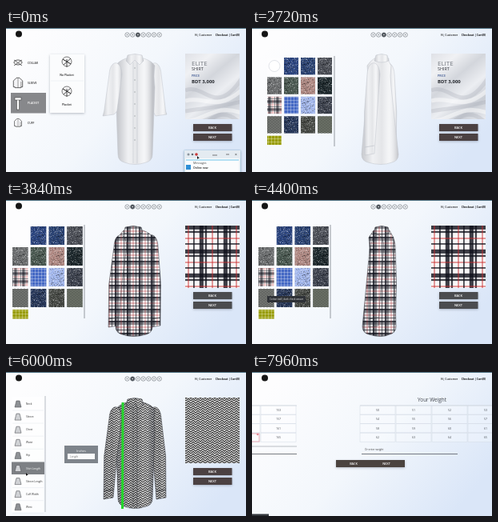
Write an HTML page with a canvas that moves like this. It is 300 px wide and 180 px high and loops after 8 s.

```html
<!DOCTYPE html>
<html lang="en">
<head>
<meta charset="utf-8">
<title>Shirt designer</title>
<style>
html, body { margin: 0; width: 100%; height: 100%; overflow: hidden; background: #eef3fb; }
canvas { display: block; width: 300px; height: 180px; }
</style>
</head>
<body>
<canvas id="stage" width="300" height="180"></canvas>
<script>
const g = document.getElementById('stage').getContext('2d');
const LOOP = 8000;
const clamp = v => Math.max(0, Math.min(1, v));
const ease = v => { v = clamp(v); return v * v * (3 - 2 * v); };
const mix = (a, b, k) => a + (b - a) * k;

function rect(x, y, w, h, fill, line) {
  g.fillStyle = fill;
  g.fillRect(x, y, w, h);
  if (line) { g.strokeStyle = line; g.lineWidth = .5; g.strokeRect(x, y, w, h); }
}
function line(x1, y1, x2, y2, color, w = 1) {
  g.strokeStyle = color; g.lineWidth = w;
  g.beginPath(); g.moveTo(x1, y1); g.lineTo(x2, y2); g.stroke();
}
function dot(x, y, r, fill, stroke) {
  g.beginPath(); g.arc(x, y, r, 0, 7);
  if (fill) { g.fillStyle = fill; g.fill(); }
  if (stroke) { g.strokeStyle = stroke; g.lineWidth = .7; g.stroke(); }
}
function text(s, x, y, size, color = '#333', align = 'left', weight = 400) {
  g.font = `${weight} ${size}px "Open Sans", Arial, sans-serif`;
  g.textAlign = align; g.fillStyle = color;
  g.fillText(s, x, y);
}
function shadowed(draw) {
  g.save();
  g.shadowColor = 'rgba(60,70,90,.35)'; g.shadowBlur = 3; g.shadowOffsetY = 1;
  draw();
  g.restore();
}

// ---- fabrics ----
function weave(size, draw) {
  const c = document.createElement('canvas');
  c.width = c.height = size;
  draw(c.getContext('2d'), size);
  return g.createPattern(c, 'repeat');
}
const plaid = size => weave(size, (p, s) => {
  const bar = (at, w, color) => {
    p.fillStyle = color;
    p.fillRect(at * s, 0, w * s, s);
    p.fillRect(0, at * s, s, w * s);
  };
  p.fillStyle = '#f8f7f7'; p.fillRect(0, 0, s, s);
  bar(.06, .17, 'rgba(14,16,26,.8)');
  bar(.29, .08, 'rgba(14,16,26,.75)');
  bar(.58, .04, 'rgba(200,40,45,.75)');
  bar(.8, .06, 'rgba(14,16,26,.75)');
});
const herring = weave(6, p => {
  p.fillStyle = '#c2c2c2'; p.fillRect(0, 0, 6, 6);
  p.fillStyle = '#3a3a3a';
  for (let i = 0; i < 6; i++) {
    const x = i < 3 ? i : 5 - i;
    for (let y = 0; y < 6; y += 3) p.fillRect(i, (x + y) % 6, 1, 1.3);
  }
});
const speckle = color => weave(24, (p, s) => {
  p.fillStyle = color; p.fillRect(0, 0, s, s);
  let seed = 7;
  const next = () => (seed = seed * 16807 % 2147483647) / 2147483647 * s | 0;
  for (let i = 0; i < 260; i++) {
    p.fillStyle = i % 2 ? 'rgba(255,255,255,.25)' : 'rgba(0,0,0,.25)';
    p.fillRect(next(), next(), 1, 1);
  }
});
const check = color => weave(4, (p, s) => {
  p.fillStyle = color; p.fillRect(0, 0, s, s);
  p.fillStyle = 'rgba(255,255,255,.3)';
  p.fillRect(0, 0, 1, s); p.fillRect(0, 2, s, 1);
});
const stripe = (color, dark) => weave(4, (p, s) => {
  p.fillStyle = color; p.fillRect(0, 0, s, s);
  p.fillStyle = dark;
  for (let i = 0; i < s; i++) p.fillRect(i * 2 % s, i, 2, 1);
});
const PLAID_S = plaid(15), PLAID_L = plaid(30);
const swatches = [
  '#fdfdfe', ...['#2d4680', '#2c4474', '#4d5058', '#6d6f70', '#4b5a52', '#b08a84', '#1f2a2e'].map(speckle),
  plaid(10), check('#4468c4'), speckle('#a4b8ec'), speckle('#3f4450'),
  stripe('#8a8d88', '#4a4c4a'), speckle('#2a3a5c'), speckle('#4a4d48'), stripe('#7c8176', '#4c524a'),
  check('#989c08')
];

// ---- shirt ----
// collar x, collar half width, shoulders, hem corners, left arm top and cuff, right arm top and cuff
const FRONT = [161, 11, 137, 186, 140, 183, 137, 128, 186, 194];
const SIDE = [162, 9, 144, 174, 137, 183, 152, 147, 170, 174];
const BACK = [159, 12, 140, 184, 137, 183, 143, 134, 182, 187];
const PROFILE = [162, 10, 146, 177, 138, 180, 157, 152, 171, 173];
const turns = [[2020, FRONT], [2720, SIDE], [3840, BACK], [4400, PROFILE], [4540, FRONT]];

function poseAt(t) {
  let i = 0;
  while (i < turns.length - 2 && t > turns[i + 1][0]) i++;
  const [t0, a] = turns[i], [t1, b] = turns[i + 1];
  const k = clamp((t - t0) / (t1 - t0));
  return a.map((v, n) => mix(v, b[n], k));
}
function cloth(path, fabric, x1, x2, edge) {
  g.fillStyle = fabric; g.fill(path);
  const shade = g.createLinearGradient(x1, 0, x2, 0);
  shade.addColorStop(0, 'rgba(40,45,60,.22)');
  shade.addColorStop(.3, 'rgba(40,45,60,.02)');
  shade.addColorStop(.55, 'rgba(40,45,60,.08)');
  shade.addColorStop(.75, 'rgba(255,255,255,.06)');
  shade.addColorStop(1, 'rgba(40,45,60,.25)');
  g.fillStyle = shade; g.fill(path);
  g.strokeStyle = edge; g.lineWidth = .5; g.stroke(path);
}
function sleeve(x, cuff, bottom, fabric, edge) {
  const p = new Path2D(), w = bottom < 120 ? 7 : 6, mid = mix(x, cuff, .7), elbow = Math.min(105, bottom - 4);
  p.moveTo(x - 8, 58);
  p.bezierCurveTo(x - 7, 39, x + 7, 39, x + 8, 58);
  p.lineTo(mid + 8, elbow);
  p.lineTo(cuff + w, bottom);
  p.lineTo(cuff - w, bottom + 2);
  p.lineTo(mid - 8, elbow);
  p.closePath();
  cloth(p, fabric, Math.min(x, cuff) - 8, Math.max(x, cuff) + 8, edge);
  if (bottom > 120) line(cuff - w, bottom - 8, cuff + w, bottom - 10, edge, .7);
}
function shirt([cx, cw, sl, sr, hl, hr, lx, lc, rx, rc], fabric, edge, sleeveEnd, front) {
  if (sleeveEnd) sleeve(rx, rc, sleeveEnd, fabric, edge);
  const body = new Path2D();
  body.moveTo(cx - cw, 38);
  body.quadraticCurveTo(sl + 4, 41, sl, 47);
  body.quadraticCurveTo(sl + 2, 60, sl, 74);
  body.lineTo(hl, 158);
  body.quadraticCurveTo(hl, 166, hl + 8, 168);
  body.quadraticCurveTo(cx, 173, hr - 8, 168);
  body.quadraticCurveTo(hr, 166, hr, 158);
  body.lineTo(sr, 74);
  body.quadraticCurveTo(sr - 2, 60, sr, 47);
  body.quadraticCurveTo(sr - 4, 41, cx + cw, 38);
  body.closePath();
  cloth(body, fabric, hl, hr, edge);
  if (front) {
    line(cx - 2, 43, cx - 2, 169, edge, .5);
    line(cx + 3, 43, cx + 3, 169, edge, .5);
    for (let y = 50; y < 155; y += 15) dot(cx, y, .7, '#9a9da2');
  }
  if (sleeveEnd) sleeve(lx, lc, sleeveEnd, fabric, edge);
  const collar = new Path2D();
  collar.moveTo(cx - cw + 2, 34);
  collar.quadraticCurveTo(cx, 31, cx + cw - 2, 34);
  collar.lineTo(cx + cw, 41);
  if (front) {
    collar.lineTo(cx + 6, 46); collar.lineTo(cx, 40); collar.lineTo(cx - 6, 46);
    collar.lineTo(cx - cw, 41);
  } else collar.quadraticCurveTo(cx, 45, cx - cw, 41);
  collar.closePath();
  cloth(collar, fabric, cx - cw, cx + cw, edge);
}
function shirtIcon(x, y, s = 1) {
  g.save(); g.translate(x, y); g.scale(s, s);
  g.beginPath();
  g.moveTo(-2, -6); g.lineTo(2, -6); g.lineTo(6, -2); g.lineTo(6, 6); g.lineTo(4, 6);
  g.lineTo(4, 7); g.lineTo(-4, 7); g.lineTo(-4, 6); g.lineTo(-6, 6); g.lineTo(-6, -2);
  g.closePath();
  g.fillStyle = '#f4f4f6'; g.fill();
  g.strokeStyle = '#333'; g.lineWidth = .8; g.stroke();
  line(0, -5, 0, 7, '#555', .6); line(4, -1, 4, 6, '#555', .6);
  g.restore();
}

// ---- page parts ----
function backdrop() {
  const sky = g.createLinearGradient(40, 0, 250, 180);
  sky.addColorStop(0, '#fdfdfe'); sky.addColorStop(.5, '#f3f7fc'); sky.addColorStop(1, '#dae6f8');
  rect(0, 0, 300, 180, sky);
  rect(0, 0, 300, 1, '#4f7182');
}
function header(step) {
  dot(16, 7.5, 4, '#151515');
  for (let i = 0; step >= 0 && i < 7; i++) {
    const on = i === step;
    dot(151.5 + i * 6.7, 8.5, 2.7, on ? '#454b52' : '#f2f5f8', '#7b8188');
    dot(151.5 + i * 6.7, 8.5, .8, on ? '#fff' : '#858b92');
  }
  text('Hi, Customer', 236, 10, 3.4, '#222', 'left', 600);
  text('Checkout | Cart(0)', 292, 10, 3.3, '#111', 'right', 700);
}
function button(y, label, color) {
  shadowed(() => rect(234, y, 48.5, 9, color));
  text(label, 258, y + 6, 4, '#fff', 'center', 600);
}
function product(fabric, h) {
  if (fabric) {
    rect(224, 32, 68, h, fabric);
    return;
  }
  const satin = g.createLinearGradient(224, 32, 292, 114);
  ['#dfe1e6', '#f0f1f4', '#d3d6dc', '#eceef2', '#c9cdd4', '#e9ebef'].forEach((c, i) => satin.addColorStop(i / 5, c));
  rect(224, 32, 68, h, satin);
  g.save();
  g.beginPath(); g.rect(224, 32, 68, h); g.clip();
  for (let i = 0; i < 5; i++) {
    g.beginPath(); g.moveTo(224, 78 + i * 13);
    g.bezierCurveTo(248, 68 + i * 16, 262, 112 - i * 6, 294, 64 + i * 14);
    g.strokeStyle = i % 2 ? 'rgba(255,255,255,.5)' : 'rgba(150,156,168,.25)';
    g.lineWidth = 5; g.stroke();
  }
  g.restore();
  text('ELITE', 232, 47, 8, '#777b82');
  text('SHIRT', 232, 53, 5.4, '#33363c');
  text('PRICE', 232, 61, 3.6, '#34508c', 'left', 600);
  text('BDT 3,000', 232, 69, 6, '#22252b', 'left', 700);
}
function menu(selected) {
  ['COLLAR', 'SLEEVE', 'PLACKET', 'CUFF'].forEach((name, i) => {
    const y = 44 + i * 25, on = i === selected;
    if (on) rect(6, y - 13, 44, 25.5, '#87888b');
    if (i === 0) {
      g.beginPath(); g.ellipse(15, y - 1, 5, 3, 0, 0, 7);
      g.fillStyle = '#fff'; g.fill(); g.strokeStyle = '#333'; g.lineWidth = .8; g.stroke();
      line(10, y - 4, 20, y + 3, '#333', .7); line(20, y - 4, 10, y + 3, '#333', .7);
    } else if (i === 2) {
      rect(13.5, y - 6, 3, 14, '#fff', '#333');
      rect(11, y - 7, 8, 3, '#fff', '#333');
    } else shirtIcon(15, y - 1, i === 3 ? .75 : .95);
    text(name, 27, y + 1, 3.4, on ? '#fff' : '#333', 'left', 600);
  });
  shadowed(() => rect(55, 33, 43, 73, '#fbfcfd'));
  line(56, 66, 97, 66, '#e1e4e8', .5);
  const names = selected === 2 ? ['No Placket', 'Placket'] : ['Full', 'Half'];
  names.forEach((name, i) => {
    const y = 44 + i * 37;
    if (selected === 2) {
      dot(76, y - 2, 6, '#f7f7f8', '#444');
      line(71, y - 5, 81, y + 1, '#222', 1); line(81, y - 6, 72, y + 2, '#222', .8);
      line(76, y - 5, 76, y + 5, '#222', .8);
    } else shirtIcon(75, y + 1, 1.2);
    text(name, 76, y + 16, 3.4, '#222', 'center', 600);
  });
}
function fabrics(k) {
  const x0 = mix(19, 8, k), y0 = mix(37, 33, k), px = mix(21, 22.7, k), py = mix(24.4, 26, k);
  swatches.forEach((f, i) => {
    const x = x0 + i % 4 * px, y = y0 + Math.floor(i / 4) * py;
    rect(x, y, px - 3, i === 16 ? 11.5 : py - 3, f);
    if (i === 0 && k < 1) dot(x + 9, y + 10.5, 7, '#fff', '#d4d9e0');
  });
  const bar = mix(103, 98, k);
  line(bar, y0 - 2, bar, 148, '#a5aab1', 1.2);
}
function options(selected) {
  rect(7, 31, 40, 144, 'rgba(255,255,255,.75)');
  line(49, 30, 49, 175, '#a9aeb5', .8);
  ['Neck', 'Sleeve', 'Chest', 'Waist', 'Hip', 'Shirt Length', 'Sleeve Length', 'Cuff Width', 'Wrist'].forEach((name, i) => {
    const y = 40 + i * 16.1, on = i === selected;
    if (on) rect(7, y - 8, 41, 15.5, '#7d8084');
    else line(8, y + 8, 47, y + 8, '#e3e6ea', .5);
    g.beginPath();
    g.moveTo(13, y - 4); g.lineTo(17, y - 4); g.lineTo(19, y + 4); g.lineTo(11, y + 4); g.closePath();
    g.fillStyle = i % 4 ? '#d0d2d5' : '#8e9195'; g.fill();
    g.strokeStyle = '#54575b'; g.lineWidth = .6; g.stroke();
    text(name, 25, y + 1, 3.2, on ? '#fff' : '#333');
  });
}
function lengthBox() {
  rect(73, 92, 42, 22, '#7e848b');
  text('Inches', 94, 100, 3.8, '#fff', 'center');
  rect(77, 102, 34, 7, '#fafbfc');
  text('Length', 80, 106.7, 3.2, '#777');
}
function pointer(x, y) {
  g.beginPath();
  g.moveTo(x, y); g.lineTo(x, y + 4); g.lineTo(x + 1.1, y + 3); g.lineTo(x + 2.8, y + 3);
  g.closePath(); g.fillStyle = '#111'; g.fill();
}
function form(x, title, first, hint) {
  text(title, x + 90, 37, 6.4, '#43474d', 'center');
  line(x, 42, x + 180, 42, '#b9c0c9', .6);
  for (let i = 0; i < 16; i++) {
    const cx = x + i % 4 * 45, cy = 42 + Math.floor(i / 4) * 11.4;
    rect(cx, cy, 44, 11, 'rgba(255,255,255,.25)', '#d3dae4');
    text(first + i, cx + 22, cy + 7, 3.6, '#4c5056', 'center');
  }
  text(hint, x + 6, 98, 3.2, '#444');
  line(x + 2, 102.5, x + 122, 102.5, '#5a5e64', .8);
}
function formPage(t) {
  const enter = 75 * (1 - ease((t - 6360) / 400));
  const slide = ease((t - 7200) / 760);
  if (slide > 0) form(mix(340, 135, slide), 'Your Weight', 50, 'Or enter weight');
  const old = mix(60 + enter, -124, slide);
  form(old, 'Your Height', 150, 'Or enter height');
  line(old, 93, old + 180, 93, '#8d949c', .6);
  line(old + 122, 102.5, old + 180, 102.5, '#5a5e64', .8);
  g.strokeStyle = '#e59aa5'; g.lineWidth = .8;
  g.strokeRect(old + 92, 77, 41, 10);
  dot(old + 131, 78, 1.3, '#e58d9a');
  shadowed(() => rect(105, 110, 86, 9, '#4b433f'));
  text('BACK', 127, 116, 3.8, '#fff', 'center', 600);
  text('NEXT', 168, 116, 3.8, '#fff', 'center', 600);
  rect(0, 177.5, 21, 2.5, '#33373c');
}
function popup(t) {
  const y = 153 + 28 * ease((t - 120) / 280);
  if (y >= 180) return;
  shadowed(() => rect(223, y, 70, 30, '#fbfcfd', '#8cc5e4'));
  rect(223, y, 70, 10, '#e4ebf1');
  dot(228, y + 5, 1.5, '#8a949d'); dot(233, y + 5, 1.3, '#5f6870');
  dot(238, y + 5, 1.8, '#c93a3a');
  line(258, y + 6, 264, y + 6, '#444', .7); line(275, y + 5, 279, y + 5, '#444', .7);
  text('×', 286, y + 7, 5, '#333');
  line(225, y + 12, 291, y + 12, '#6cc3e9', 1);
  rect(225, y + 18, 6, 6, '#2f8fd6');
  text('Messages', 234, y + 17, 3.6, '#444');
  text('Online now', 234, y + 23, 3.4, '#222', 'left', 600);
  pointer(239, y + 7);
}

function draw(t) {
  backdrop();
  if (t >= 6360) {
    header(-1);
    formPage(t);
    return;
  }
  const isPlaid = t >= 2860 && t < 4540, isHerring = t >= 4540;
  header(isPlaid || isHerring ? 1 : 2);
  product(isPlaid ? PLAID_L : isHerring ? herring : null, isPlaid ? 78 : 82);
  const color = isPlaid ? '#4b4c4f' : '#4b4142', top = isPlaid ? 115 : 120;
  button(top, 'BACK', color);
  button(top + 12, 'NEXT', color);

  const fabric = isPlaid ? PLAID_S : isHerring ? herring : '#f4f5f7';
  const edge = isPlaid || isHerring ? '#33353a' : '#bfc3ca';
  const end = t < 1180 ? 108 : t < 2020 ? 0 : 157;
  shirt(poseAt(t), fabric, edge, end, t < 2300 || isHerring);

  if (t < 2020) {
    menu(t < 540 ? 2 : 1);
    if (t >= 1180) {
      g.beginPath(); g.moveTo(128, 54); g.quadraticCurveTo(126, 37, 134, 36);
      g.quadraticCurveTo(140, 38, 138, 47); g.lineTo(132, 46); g.lineTo(132, 54); g.closePath();
      g.fillStyle = '#f8f9fa'; g.fill(); g.strokeStyle = '#a7acb4'; g.lineWidth = .7; g.stroke();
      pointer(118, 76);
    }
    popup(t);
  } else if (t < 4540) {
    fabrics(t < 2860 ? 0 : 1);
    if (t >= 4100) {
      rect(19, 120, 48, 8, '#2f3237');
      text('Cotton twill, dark check weave', 43, 125.3, 3, '#e8e8e8', 'center');
    }
  } else {
    options(t < 5380 ? 4 : 5);
    if (t >= 5380) lengthBox();
    if (t >= 5520) line(146, 38, 145.5, 171, '#24d62c', 3);
    pointer(25, 126);
  }
}

function tick() {
  draw(performance.now() % LOOP);
  requestAnimationFrame(tick);
}
tick();
</script>
</body>
</html>
```
